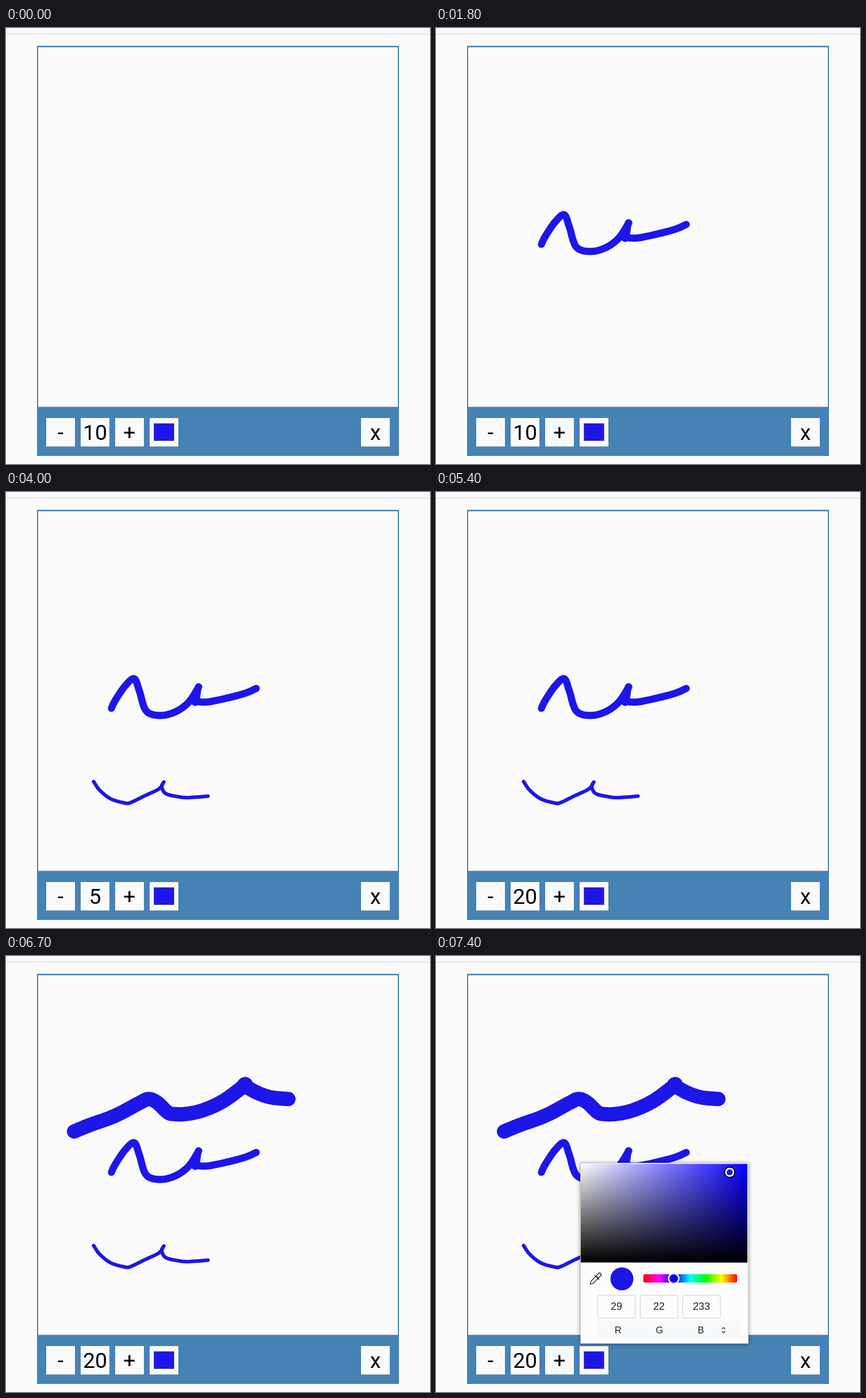
Recreate the animation shown at these times as an HTML page with a canvas. Size 738 by 759 pixels, loop 8000 ms.

```html
<!DOCTYPE html>
<html lang="en">
<head>
<meta charset="utf-8">
<title>Drawing pad</title>
<style>
  html, body { margin: 0; width: 100%; height: 100%; overflow: hidden; background: #fafafa; }
  canvas { display: block; width: 738px; height: 759px; }
</style>
</head>
<body>
<canvas id="pad" width="738" height="759"></canvas>
<script>
const ctx = document.getElementById('pad').getContext('2d');
const LOOP = 8000, TICK = 100;
const INK = '#1d16e9', STEEL = '#4682b4', PAPER = '#fafafa', HUE = '#0800ff';
const ROBOTO = '37.5px Roboto, sans-serif';
const SANS = '"Liberation Sans", Arial, sans-serif';

// A repeated key point makes a sharp corner.
const strokes = [
  { start: 900, ticks: 9, size: 10, line: spline([
    [183.5, 376.5], [190, 363], [207, 338], [223, 325], [232, 346], [244, 381], [268, 389],
    [294, 383], [317, 367], [334, 342], [334, 342], [330.5, 364.5], [330.5, 364.5],
    [355, 365], [411, 352], [435.5, 342]]) },
  { start: 3500, ticks: 6, size: 5, line: spline([
    [152.5, 504], [163, 519], [182, 534], [205, 541], [216, 541], [241, 529], [266, 517],
    [274, 506], [274, 506], [271, 513], [278, 525], [300, 530.5], [318, 532], [351.5, 529.5]]) },
  { start: 5900, ticks: 9, size: 20, line: spline([
    [118.5, 305.5], [144, 295], [190, 278], [232, 256], [248, 249], [263, 255], [280, 271],
    [290, 275], [313, 275], [343, 268.5], [379, 252], [415, 225.5], [415, 225.5],
    [436, 237.5], [461, 246], [491.5, 249]]) }
];

// Catmull-Rom curve through the keys, as short segments
function spline(keys, n = 10) {
  const at = i => keys[Math.max(0, Math.min(keys.length - 1, i))];
  const line = [keys[0]];
  for (let i = 0; i < keys.length - 1; i++) {
    const [a, b, c, d] = [at(i - 1), at(i), at(i + 1), at(i + 2)];
    for (let j = 1; j <= n; j++) {
      const u = j / n;
      line.push([0, 1].map(k => b[k] + u / 2 * (c[k] - a[k] +
        u * (2 * a[k] - 5 * b[k] + 4 * c[k] - d[k] + u * (3 * (b[k] - c[k]) + d[k] - a[k])))));
    }
  }
  return line;
}

// The first part of a line, by share of its length
function cut(line, share) {
  const step = i => Math.hypot(line[i][0] - line[i - 1][0], line[i][1] - line[i - 1][1]);
  let left = 0;
  for (let i = 1; i < line.length; i++) left += step(i);
  left *= share;
  const part = [line[0]];
  for (let i = 1; i < line.length && left > 0.01; i++) {
    const len = step(i), u = Math.min(1, left / (len || 1));
    part.push(line[i].map((v, k) => line[i - 1][k] + (v - line[i - 1][k]) * u));
    left -= len;
  }
  return part;
}

function rect(x, y, w, h, fill) {
  ctx.fillStyle = fill;
  ctx.fillRect(x, y, w, h);
}

function disc(x, y, r, fill) {
  ctx.fillStyle = fill;
  ctx.beginPath();
  ctx.arc(x, y, r, 0, Math.PI * 2);
  ctx.fill();
}

function label(text, x, y, font, fill) {
  ctx.font = font;
  ctx.textAlign = 'center';
  ctx.fillStyle = fill;
  ctx.fillText(text, x, y);
}

function ramp(x0, y0, x1, y1, colors) {
  const g = ctx.createLinearGradient(x0, y0, x1, y1);
  colors.forEach((c, i) => g.addColorStop(i / (colors.length - 1), c));
  return g;
}

function trace(points, color, width) {
  ctx.strokeStyle = color;
  ctx.lineWidth = width;
  ctx.lineCap = ctx.lineJoin = 'round';
  ctx.beginPath();
  points.forEach(([x, y]) => ctx.lineTo(x, y));
  ctx.stroke();
}

function drawStroke({ start, ticks, size, line }, t) {
  if (t < start) return;
  const p = Math.min(1, ((t - start) / TICK + 1) / ticks);
  trace(cut(line, 1 - (1 - p) ** 1.35), INK, size * 1.25);
}

function brushSize(t) {
  if (t < 3100) return 10;
  if (t < 5000) return 5;
  if (t < 5200) return 10;
  return t < 5400 ? 15 : 20;
}

function drawFrame() {
  rect(0, 0, 738, 759, PAPER);
  rect(0, 6, 738, 2, '#f3f3f3');
  rect(0, 10, 738, 1, '#cfcfcf');
  rect(54, 31, 630, 714, STEEL);
  rect(56, 33.5, 626, 626, PAPER);
}

function drawBar(t) {
  const cells = [[70, '-'], [130, brushSize(t)], [190, '+'], [250, ''], [618, 'x']];
  for (const [x, text] of cells) {
    rect(x, 679, 50, 49.5, PAPER);
    label(text, x + 25, 716.5, ROBOTO, '#000');
  }
  rect(257, 688, 36, 31, '#767676');
  rect(258, 689, 34, 29, INK);
}

function drawDropper() {
  ctx.save();
  ctx.translate(277.5, 562);
  ctx.rotate(Math.PI / 4);
  trace([[-2.6, -3], [-2.6, 9], [0, 13], [2.6, 9], [2.6, -3]], '#222', 1.3);
  trace([[-5, -3.5], [5, -3.5]], '#222', 1.5);
  ctx.beginPath();
  ctx.roundRect(-2.8, -13, 5.6, 9, 2.8);
  ctx.stroke();
  ctx.restore();
}

function drawShades() {
  rect(252, 362, 290, 171.5, ramp(252, 0, 542, 0, ['#fff', HUE]));
  rect(252, 362, 290, 171.5, ramp(0, 362, 0, 533, ['rgba(0,0,0,0)', '#000']));
  disc(511.2, 376.5, 10, '#000');
  disc(511.2, 376.5, 8, '#fff');
  disc(511.2, 376.5, 5.3, INK);
}

function drawHueBar() {
  ctx.fillStyle = ramp(361, 0, 524, 0, ['#f00', '#f0f', '#00f', '#0ff', '#0f0', '#ff0', '#f00']);
  ctx.beginPath();
  ctx.roundRect(361, 554, 163, 14.5, 2.5);
  ctx.fill();
  disc(413.8, 561.5, 10.2, '#fff');
  disc(413.8, 561.5, 7.6, HUE);
}

function drawFields() {
  rect(281, 636, 250, 31, '#f8f8f8');
  [['R', 29], ['G', 22], ['B', 233]].forEach(([name, value], i) => {
    const x = 281.5 + i * 74;
    ctx.strokeStyle = '#cecece';
    ctx.lineWidth = 1;
    ctx.beginPath();
    ctx.roundRect(x, 590.5, 65.5, 40, 2.5);
    ctx.stroke();
    label(value, x + 32.5, 616, '18px ' + SANS, '#222');
    label(name, 317 + i * 72, 656.5, '16.5px ' + SANS, '#222');
  });
  for (const side of [-1, 1]) {
    const y = 651.3 + side * 2.2;
    trace([[498, y], [500.5, y + side * 2.5], [503, y]], '#222', 1.3);
  }
}

function drawPicker(alpha) {
  ctx.save();
  ctx.globalAlpha = alpha;
  ctx.shadowColor = 'rgba(0,0,0,.4)';
  ctx.shadowBlur = 7;
  ctx.shadowOffsetY = 1;
  rect(251, 360, 293, 315, '#c4c4c4');
  ctx.shadowColor = 'transparent';
  rect(252, 361, 291, 313, '#fcfcfc');
  drawShades();
  drawDropper();
  disc(323.6, 562, 20, INK);
  drawHueBar();
  drawFields();
  ctx.restore();
}

function draw() {
  const t = Math.floor((performance.now() % LOOP) / TICK) * TICK;
  drawFrame();
  strokes.forEach(s => drawStroke(s, t));
  drawBar(t);
  if (t >= 7300) drawPicker(t < 7400 ? 0.5 : 1);
  requestAnimationFrame(draw);
}
draw();
</script>
</body>
</html>
```
